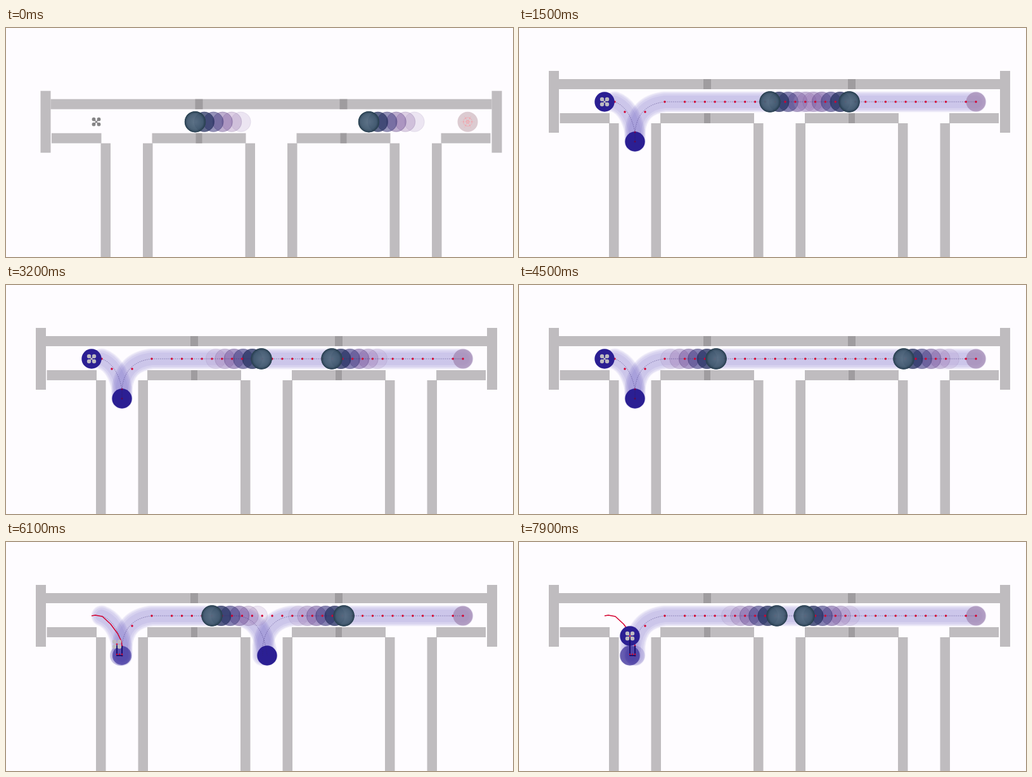
These frames come from a looping animation (800 by 363 pixels, 8000 ms). An HTML page with a canvas:

```html
<!DOCTYPE html>
<html lang="en">
<head>
<meta charset="utf-8">
<title>Corridor planner</title>
<style>
html, body { margin: 0; width: 100%; height: 100%; overflow: hidden; background: #fefcff; }
canvas { display: block; }
</style>
</head>
<body>
<canvas id="stage" width="800" height="363"></canvas>
<script>
const ctx = document.getElementById('stage').getContext('2d');
const LOOP = 8000, STEP = 100;
const ROW = 117, CELL = 15.84, END = 721;
const NAVY = '#2b1f93', RED = '#d4002f';

// Obstacle keys: [seconds, x]
const RIGHTWARD = [[0, 291], [1.5, 396], [3.2, 514], [4.5, 607], [4.78, 627], [5.5, 576], [6.8, 483], [8, 400]];
const LEFTWARD = [[0, 565], [0.43, 595], [1.5, 521], [3.2, 403], [4.5, 311], [5.2, 261.5], [5.5, 283], [6.8, 374], [8, 457]];
const GHOSTS = [
  'rgba(35,48,95,.72)', 'rgba(65,60,128,.55)', 'rgba(112,78,150,.45)',
  'rgba(150,112,172,.32)', 'rgba(180,155,200,.24)'
];

// Route flown by the drone
const ROUTE = [[135, 117], [141, 116], [152, 118], [165, 130], [176, 145], [182, 157], [183, 165], [183, 180], [175, 180], [175, 149]];
const ENTRY = new Path2D('M151 117 Q175 126 183 165 V180');
const EXIT = new Path2D('M183 180 V165 Q187 122 230 117 H721');
const TO_SECOND = new Path2D('M183 180 V165 Q187 122 230 117 H364 Q405 120 412 180');
const FROM_SECOND = new Path2D('M405 180 V165 Q411 122 452 117 H721');
const ENTRY_DOTS = [[151, 117], [167, 133]];

const clamp = v => Math.max(0, Math.min(1, v));
const ease = v => v * v * (3 - 2 * v);

function rect(color, x1, y1, x2, y2) {
  ctx.fillStyle = color;
  ctx.fillRect(x1, y1, x2 - x1, y2 - y1);
}

function disc(x, y, r, color) {
  ctx.fillStyle = color;
  ctx.beginPath();
  ctx.arc(x, y, r, 0, 7);
  ctx.fill();
}

function ring(x, y, r, color, width) {
  ctx.strokeStyle = color;
  ctx.lineWidth = width;
  ctx.beginPath();
  ctx.arc(x, y, r, 0, 7);
  ctx.stroke();
}

function walls() {
  const wall = '#bfbcbf', notch = '#9f9c9f';
  rect(wall, 63, 81, 759, 97);
  for (const x of [47, 759]) rect(wall, x, 68, x + 16, 166);
  rect(wall, 64.5, 135, 143, 151);
  rect(wall, 223, 135, 371, 151);
  rect(wall, 451, 135, 599, 151);
  rect(wall, 679, 135, 757, 151);
  for (const x of [142, 370, 598]) {
    rect(wall, x, 151, x + 15.5, 420);
    rect(wall, x + 66.5, 151, x + 82, 420);
  }
  for (const x of [291, 519]) {
    rect(notch, x, 81, x + 12, 97);
    rect(notch, x + 1, 135, x + 11, 151);
  }
}

function obstacle(keys, t) {
  let i = 0;
  while (i < keys.length - 2 && t >= keys[i + 1][0]) i++;
  const [t0, x0] = keys[i], [t1, x1] = keys[i + 1];
  return { x: x0 + (x1 - x0) * (t - t0) / (t1 - t0), dir: Math.sign(x1 - x0) };
}

function ghosts({ x, dir }) {
  for (let k = GHOSTS.length; k >= 1; k--) {
    const gx = x + dir * 14.4 * k;
    disc(gx, ROW, 16, GHOSTS[k - 1]);
    ring(gx, ROW, 15.5, `rgba(50,50,90,${0.3 - k * 0.05})`, 1);
  }
}

function head({ x }) {
  const fill = ctx.createRadialGradient(x, ROW, 2, x, ROW, 16.5);
  fill.addColorStop(0, 'rgba(84,106,128,.95)');
  fill.addColorStop(0.7, 'rgba(66,90,112,.95)');
  fill.addColorStop(1, 'rgba(36,58,78,.95)');
  disc(x, ROW, 16.5, fill);
  ring(x, ROW, 16, '#2c4454', 1.5);
}

function band(path) {
  ctx.lineCap = 'round';
  ctx.lineJoin = 'round';
  ctx.strokeStyle = 'rgba(70,58,178,.075)';
  for (const w of [33, 30, 26, 20]) {
    ctx.lineWidth = w;
    ctx.stroke(path);
  }
}

function dotted(path) {
  ctx.lineCap = 'butt';
  ctx.strokeStyle = 'rgba(50,35,110,.75)';
  ctx.lineWidth = 0.8;
  ctx.setLineDash([1.2, 1.8]);
  ctx.stroke(path);
  ctx.setLineDash([]);
}

function pathDots() {
  for (let k = 0; k <= 31; k++) {
    if (k !== 2 && k !== 30) disc(END - k * CELL, ROW, 1.7, RED);
  }
  disc(199, 133, 1.7, RED);
}

function partial(points, length) {
  const out = [points[0]];
  for (let i = 1; i < points.length && length > 0; i++) {
    const [ax, ay] = points[i - 1], [bx, by] = points[i];
    const d = Math.hypot(bx - ax, by - ay), f = Math.min(1, length / d);
    out.push([ax + (bx - ax) * f, ay + (by - ay) * f]);
    length -= d;
  }
  return out;
}

function polyline(points, color, width) {
  ctx.strokeStyle = color;
  ctx.lineWidth = width;
  ctx.beginPath();
  points.forEach(([x, y]) => ctx.lineTo(x, y));
  ctx.stroke();
}

function drone(x, y, color, r) {
  ctx.strokeStyle = color;
  ctx.lineWidth = 1.6;
  ctx.beginPath();
  ctx.moveTo(x - 4, y - 4); ctx.lineTo(x + 4, y + 4);
  ctx.moveTo(x + 4, y - 4); ctx.lineTo(x - 4, y + 4);
  ctx.stroke();
  for (const dx of [-4, 4]) for (const dy of [-4, 4]) disc(x + dx, y + dy, r, color);
}

function idleTarget() {
  disc(END, ROW, 16, '#dccbd1');
  ctx.strokeStyle = '#f3a0a8';
  ctx.lineWidth = 1.3;
  ctx.setLineDash([2.5, 1.8]);
  ctx.beginPath();
  for (let a = 0; a < 6; a++) {
    const c = Math.cos(a * Math.PI / 3), s = Math.sin(a * Math.PI / 3);
    ctx.moveTo(END + c, ROW + s);
    ctx.lineTo(END + c * 10, ROW + s * 10);
  }
  ctx.stroke();
  ctx.setLineDash([]);
  ring(END, ROW, 7, 'rgba(243,160,168,.6)', 1);
}

function draw(ms) {
  const t = ms / 1000;
  const pan = 1 - ease(clamp((t - 0.1) / 0.7));
  const planned = t >= 1, flying = t >= 4.6, detour = t >= 5.2 && t < 6.2, landed = t >= 6.3;
  const agents = [obstacle(RIGHTWARD, t), obstacle(LEFTWARD, t)];

  ctx.setTransform(1, 0, 0, 1, 0, 0);
  rect('#fefcff', 0, 0, 800, 363);
  ctx.translate(7.5 * pan, 31.7 * pan);
  walls();

  if (!planned) {
    idleTarget();
    agents.forEach(ghosts);
    agents.forEach(head);
    drone(135, ROW, '#858486', 2.9);
    return;
  }

  const routes = detour ? [TO_SECOND, FROM_SECOND] : [EXIT];
  if (!landed) routes.push(ENTRY);
  routes.forEach(band);
  if (landed) band(new Path2D('M175 149 V180'));
  disc(END, ROW, 15.5, 'rgba(156,128,172,.68)');

  // Goal discs
  if (detour) {
    disc(180, 180, 16, 'rgba(80,66,170,.3)');
    disc(183, 180, 15, 'rgba(50,38,150,.6)');
    disc(412, 180, 15.7, NAVY);
  } else if (landed) {
    disc(183, 180, 15.5, 'rgba(80,66,170,.2)');
    disc(175, 180, 15.7, 'rgba(52,40,150,.7)');
  } else {
    disc(183, 180, 15.7, NAVY);
  }

  agents.forEach(ghosts);
  routes.forEach(dotted);
  pathDots();
  if (!flying) ENTRY_DOTS.forEach(([x, y]) => disc(x, y, 1.7, RED));
  disc(183, 165, 1.5, '#7a0050');
  disc(183, 180, 1.5, '#5c0a50');
  agents.forEach(head);

  if (!flying) {
    disc(135, ROW, 15.7, NAVY);
    drone(135, ROW, '#bdbbc0', 3.2);
    return;
  }

  const flown = 75.5 * clamp((t - 4.6) / 0.9) + 54 * clamp((t - 5.5) / 0.8);
  const trace = partial(ROUTE, flown);
  const [x, y] = trace[trace.length - 1];
  polyline(trace.slice(0, 7), RED, 1.5);
  if (landed) disc(x, y, 15.7, NAVY);
  if (trace.length > 7) {
    polyline(trace.slice(6), '#1a1070', 2);
    for (const dx of [0, 4, 8]) disc(175 + dx, 178, 1.2, RED);
  }
  drone(x, y, '#bdbbc0', 3.2);
  disc(x, y, 1.3, RED);
}

function tick(now) {
  draw(Math.floor((now % LOOP) / STEP) * STEP);
  requestAnimationFrame(tick);
}
draw(0);
requestAnimationFrame(tick);
</script>
</body>
</html>
```
